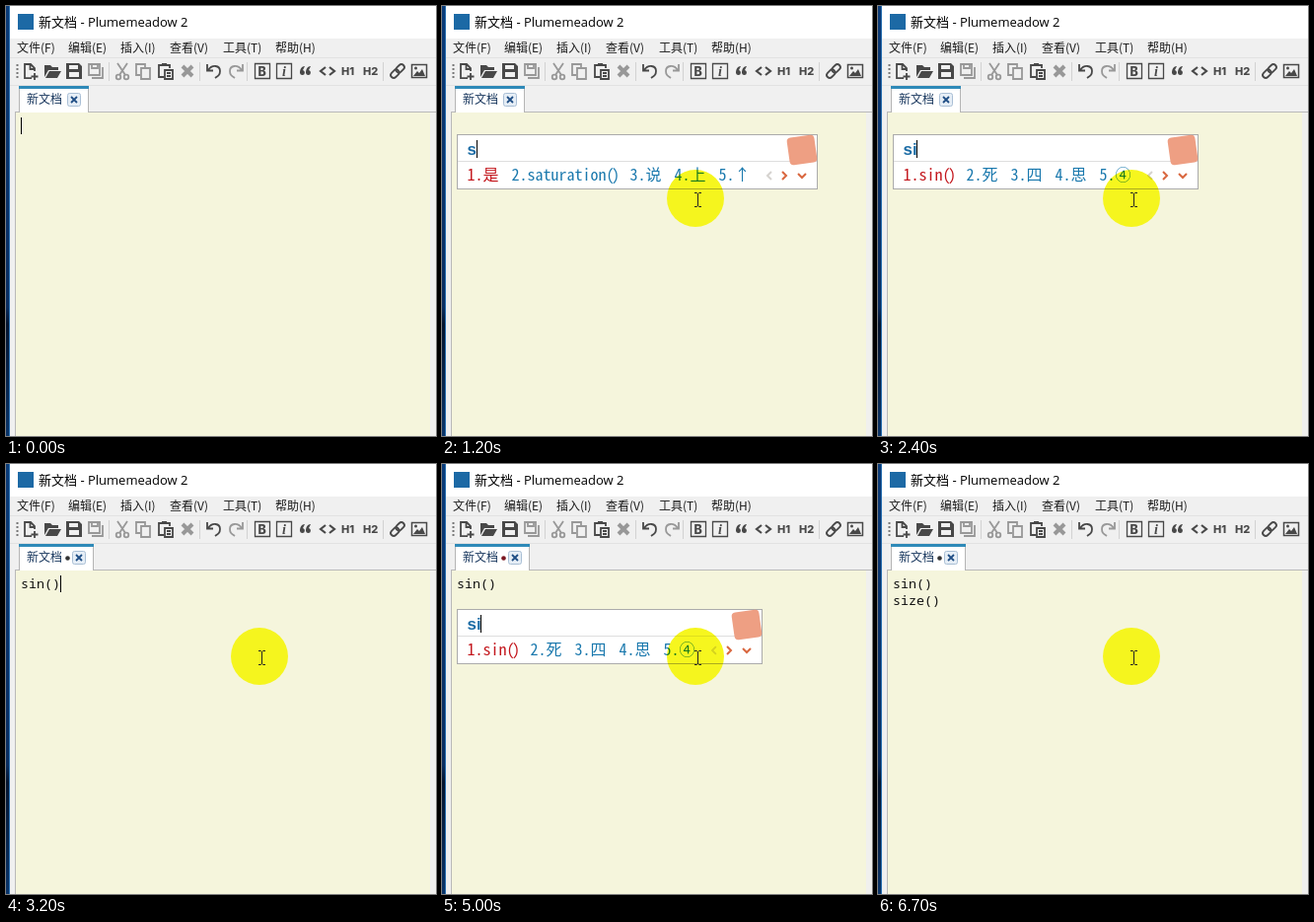
Write an HTML page that moves like this. It is 436 px wide and 436 px high and loops after 6.8 s.

```html
<!DOCTYPE html>
<html lang="zh">
<head>
<meta charset="utf-8">
<title>Plumemeadow</title>
<style>
  html, body { margin: 0; width: 100%; height: 100%; overflow: hidden; background: #f0f0f0; }
  svg { display: block; width: 436px; height: 436px; }
  text { white-space: pre; }
  .ui { font: 12px 'Noto Sans CJK SC', 'Noto Sans CJK', sans-serif; fill: #1c1c1c; }
  .title { font: 13px 'Open Sans', 'Noto Sans CJK SC', sans-serif; fill: #000; }
  .code { font: 13.33px 'Noto Sans Mono', monospace; fill: #111; }
  .cell { font: 300 16px 'Noto Sans Mono CJK SC', 'Noto Sans CJK SC', monospace; }
  .hint { font-size: 12px; }
  .typed { font: bold 17px 'Liberation Sans', sans-serif; fill: #1b6ca5; }
  .bold { font: 800 11px Inter, sans-serif; fill: #484848; }
  .line { fill: none; stroke: #484848; stroke-width: 1.8; }
  .solid { fill: #484848; }
  .off { opacity: .52; }
  .halo { fill: #f6f61e; mix-blend-mode: darken; }
</style>
</head>
<body>
<svg viewBox="0 0 436 436">
  <defs>
    <linearGradient id="desk" x2="0" y2="1">
      <stop offset="0" stop-color="#0b3b78"/><stop offset=".7" stop-color="#0a2d60"/>
      <stop offset=".74" stop-color="#04142e"/><stop offset="1" stop-color="#0a3468"/>
    </linearGradient>
  </defs>
  <rect width="436" height="436" fill="#f0f0f0"/>
  <rect width="436" height="33" fill="#fff"/>
  <rect width="3" height="436" fill="url(#desk)"/>
  <rect x="3" width="1" height="436" fill="#2a70b0"/>
  <rect x="12" y="8" width="16" height="16" fill="#1c69a5"/>
  <text class="title" x="33" y="21">新文档 - Plumemeadow 2</text>
  <g id="menu"></g>
  <path d="M4 52.5H436M4 80.5H436" stroke="#e2e2e2"/>
  <path d="M11.5 59V75" stroke="#777" stroke-width="2" stroke-dasharray="2 2"/>
  <path d="M104.5 57V76M196.5 57V76M244.5 57V76M382.5 57V76" stroke="#d2d2d2"/>

  <path class="line" d="M26 73.2H19V59H25L29 63V66M24.5 59V64H29M29 68V75M25.5 71.5H32.5"/>
  <path class="solid" d="M39 72V60H45L47 62H53V65H43ZM44 66H56L52 73H40Z"/>
  <path class="solid" fill-rule="evenodd" d="M61 58H74L77 61V74H61ZM64 60V64H73V60ZM64 67V72H74V67Z"/>
  <g class="off">
    <path class="line" d="M84 59H95V70H84ZM87 59V63H93V59M87 73H98V62"/>
    <path class="line" d="M113 58L121 70M123 58L115 70"/>
    <circle class="line" cx="114" cy="72" r="2.3"/><circle class="line" cx="122" cy="72" r="2.3"/>
    <path class="line" d="M136 70H132V59H141V62M137 63H146V74H137Z"/>
    <path class="line" d="M179 61L189 71M189 61L179 71" style="stroke-width:4"/>
    <path class="line" d="M239 65C235 59 227 60 227 66C227 70 229 71 232 73M240 59V65.5H234"/>
  </g>
  <path class="line" d="M160 72H155V60H166V63M158 59H163M161 65H169V74H161ZM163 68H167M163 71H167"/>
  <path class="line" d="M205 65C209 59 217 60 217 66C217 70 215 71 212 73M204 59V65.5H210"/>
  <path class="line" d="M252.5 58.5H267.5V73.5H252.5ZM274.5 58.5H289.5V73.5H274.5Z" style="stroke-width:1.3"/>
  <text class="bold" x="255.5" y="70.5" style="font-size:12.5px">B</text>
  <text x="280" y="71" font-family="Liberation Serif, serif" font-size="14" font-weight="bold" font-style="italic" fill="#484848">i</text>
  <path class="solid" d="M303 61C299 61 298 65 298 68A2.5 2.5 0 1 0 301 65ZM309 61C305 61 304 65 304 68A2.5 2.5 0 1 0 307 65Z"/>
  <path class="line" d="M324 62L319 66L324 70M328 62L333 66L328 70" style="stroke-width:2.2"/>
  <text class="bold" x="340" y="70">H1</text>
  <text class="bold" x="362" y="70">H2</text>
  <g transform="rotate(-45 397 66)">
    <rect class="line" x="388.5" y="63" width="9.5" height="6" rx="3"/>
    <rect class="line" x="396" y="63" width="9.5" height="6" rx="3"/>
  </g>
  <rect class="line" x="411.5" y="59.5" width="15" height="13" style="stroke-width:1.5"/>
  <path class="solid" d="M413 71L417 66L419 68L422 64L425 71Z"/>
  <circle class="solid" cx="415.5" cy="63" r="1.5"/>

  <rect x="9.5" y="107.5" width="430" height="330" fill="#f5f5dc" stroke="#b9b9b9"/>
  <rect x="430" y="108" width="6" height="328" fill="#f0f0ee"/>
  <g id="tab"></g>
  <g id="doc"></g>
  <g id="ime"></g>
  <g id="mouse"></g>
</svg>
<script>
const LOOP = 6800;
const el = id => document.getElementById(id);
const text = (cls, x, y, s, extra = '') => `<text class="${cls}" x="${x}" y="${y}" ${extra}>${s}</text>`;
const vline = (x, y, h, color = '#000') => `<path d="M${x + .5} ${y}v${h}" stroke="${color}"/>`;

// Typed letters, their caret position and the candidates offered.
const inputs = {
  s:   { caret: 35, words: ['是', 'saturation()', '说', '上', '↑'] },
  si:  { caret: 39, words: ['sin()', '死', '四', '思', '④'] },
  siz: { caret: 48, words: ['size()', '私自', '四周', '死在', 'size'], hint: '更多英文补全(分号+E)' },
};

// start, input, committed lines, caret line (-1: hidden), pointer
const steps = [
  [0, '', [], 0, ''],
  [100, '', [], 0, 'beam'],
  [600, '', [], -1, 'beam'],
  [1100, 's', [], -1, 'beam'],
  [1600, 'si', [], -1, 'beam'],
  [3200, '', ['sin()'], 0, 'beam'],
  [3700, '', ['sin()'], -1, 'beam'],
  [3900, '', ['sin()', ''], 1, 'beam'],
  [4300, 's', ['sin()', ''], 1, 'beam'],
  [4400, 's', ['sin()', ''], -1, 'beam'],
  [4800, 'si', ['sin()', ''], -1, 'beam'],
  [5400, 'siz', ['sin()', ''], -1, 'arrow'],
  [6200, '', ['sin()', 'size()'], 1, 'beam'],
  [6700, '', ['sin()', 'size()'], -1, 'beam'],
];

const pointers = {
  beam: '<path d="M256 189.5h2.5l1 1l1-1h2.5M259.5 190v13M256 203.5h2.5l1-1l1 1h2.5" fill="none" stroke="#222"/>',
  arrow: '<path d="M257.5 194.5v16.5l4-3.5l2.5 6l2.5-1l-2.5-6h5Z" fill="#fff" stroke="#222"/>',
};

const cellWidth = s => [...s].reduce((w, c) => w + (c > '~' ? 16 : '()'.includes(c) ? 5.5 : 8), 0);

function drawTab(edited, composing) {
  const w = edited ? 76 : 71, cx = edited ? 74 : 69;
  return `<path d="M13.5 108V82h${w - 1}v26" fill="#fff" stroke="#b5b5b5"/>
    <rect x="13" y="81" width="${w}" height="3" fill="#2f8ab8"/>` +
    text('ui', 21, 99, '新文档', 'style="fill:#17365d"') +
    (edited ? `<circle cx="62.5" cy="95.5" r="2.3" fill="${composing ? '#7a1620' : '#333'}"/>` : '') +
    `<rect x="${cx - 6.5}" y="88.5" width="13" height="13" rx="2" fill="#e6eef6" stroke="#a9bfd5"/>
    <path d="M${cx - 3} 92l6 6m0-6l-6 6" stroke="#1f4e85" stroke-width="1.8"/>`;
}

function drawIme(typed, top) {
  if (!typed) return '';
  const { caret, words, hint } = inputs[typed];
  let x = 25.5, list = '';
  words.forEach((word, i) => {
    const item = `${i + 1}.${word}`;
    const label = item.replace('()', '<tspan letter-spacing="-2.5">()</tspan>');
    list += text('cell', x, top + 47, label, `fill="${i ? '#1978ad' : '#c3161c'}"`);
    x += cellWidth(item) + 13;
  });
  const right = Math.floor(x) + 55, mid = top + 42;
  const chevron = (d, color) => `<path d="${d}" fill="none" stroke="${color}" stroke-width="2"/>`;
  return `<rect x="15.5" y="${top + .5}" width="${right - 15}" height="55" fill="#fff" stroke="#ababab"/>
    <path d="M16 ${top + 27.5}H${right}" stroke="#dedede"/>
    <rect x="${right - 29}" y="${top + 2}" width="28" height="28" rx="4" fill="#ee9f83" transform="rotate(-8 ${right - 15} ${top + 16})"/>` +
    text('typed', 25.5, top + 20.5, typed) +
    vline(caret, top + 6, 18, hint ? '#b02020' : '#000') + list +
    chevron(`M${right - 46} ${mid - 4}l-4 4l4 4`, '#d6d3d0') +
    chevron(`M${right - 35} ${mid - 4}l4 4l-4 4`, '#d9673f') +
    chevron(`M${right - 19} ${mid - 2}l4 4l4-4`, '#d9673f') +
    (hint ? `<circle cx="118" cy="${top + 13.5}" r="6.7" fill="none" stroke="#e08467"/>
      <path d="M118 ${top + 9}v2m0 1.5v5.5" stroke="#d9673f" stroke-width="1.6"/>` +
      text('cell hint', 131, top + 18, hint, 'fill="#1b6ca5"') : '');
}

function draw([, typed, lines, caretLine, pointer]) {
  el('tab').innerHTML = drawTab(lines.length, typed);
  el('doc').innerHTML = lines.map((s, i) => text('code', 15, 126 + 17 * i, s)).join('') +
    (caretLine < 0 ? '' : vline(15 + 8 * (lines[caretLine] || '').length, 113 + 17 * caretLine, 17));
  el('ime').innerHTML = drawIme(typed, lines.length > 1 ? 147 : 130);
  el('mouse').innerHTML = pointer ? '<circle class="halo" cx="257" cy="195" r="29"/>' + pointers[pointer] : '';
}

const menus = [[11, '文件(F)'], [63, '编辑(E)'], [116, '插入(I)'], [166, '查看(V)'], [220, '工具(T)'], [273, '帮助(H)']];
el('menu').innerHTML = menus.map(([x, s]) => text('ui', x, 47, s)).join('');

let shown;
function tick() {
  const t = performance.now() % LOOP;
  const step = steps.findLast(s => s[0] <= t);
  if (step !== shown) draw(shown = step);
  requestAnimationFrame(tick);
}
tick();
</script>
</body>
</html>
```
